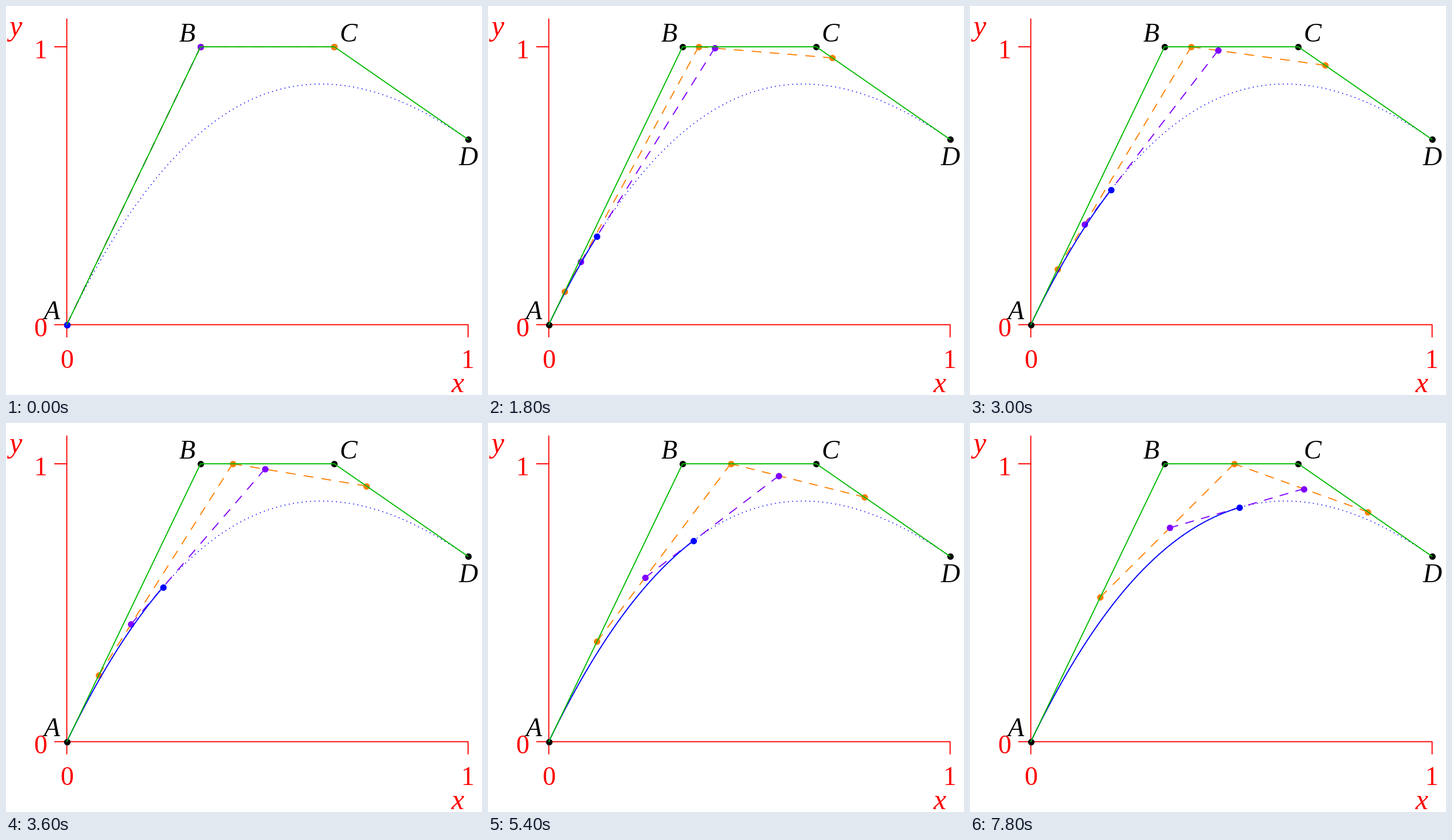
Animation, 827 px wide and 677 px high, one loop 8000 ms. Source, as a matplotlib script:

```python
import matplotlib.pyplot as plt
import numpy as np
from matplotlib.animation import FuncAnimation

WIDTH, HEIGHT, DPI = 827, 677, 72  # at 72 dpi one point is one pixel
LINE = 1.87
DOT = 6 * LINE
INTERVAL, FRAMES = 100, 80
FRAMES_PER_STEP, STEP = 3, 0.02

RED, BLUE, GREEN = "#ff0000", "#0000ff", "#00bb00"
ORANGE, PURPLE = "#ff8000", "#8000ff"

ORIGIN = np.array([105.6, 554.6])
UNIT = np.array([697.2, -483.6])
CONTROL = ORIGIN + UNIT * np.array([[0, 0], [1 / 3, 1], [2 / 3, 1], [1, 2 / 3]])

plt.rcParams["path.snap"] = False
fig = plt.figure(figsize=((WIDTH + 0.01) / DPI, (HEIGHT + 0.01) / DPI),
                 dpi=DPI, facecolor="white")
ax = fig.add_axes([0, 0, 1, 1])
ax.set_xlim(0, WIDTH)
ax.set_ylim(HEIGHT, 0)
ax.axis("off")


def blend(points, t):
    """One de Casteljau level."""
    return points[:-1] * (1 - t) + points[1:] * t


def bezier(ts):
    ts = np.asarray(ts)[:, None]
    a, b, c, d = CONTROL
    s = 1 - ts
    return s**3 * a + 3 * s**2 * ts * b + 3 * s * ts**2 * c + ts**3 * d


def line(points, color, **style):
    return ax.plot(*np.transpose(points), color=color, lw=LINE, snap=False,
                   solid_capstyle="round", solid_joinstyle="round",
                   dash_capstyle="round", **style)[0]


def dots(points, color):
    return ax.plot(*np.transpose(points), "o", color=color, ms=DOT, mew=0,
                   snap=False)[0]


def fitted_dashes(length, on, off):
    """Scale a dash pattern (in line widths) so the path ends on a dash."""
    units = length / LINE
    count = max(round((units - on) / (on + off)), 1)
    scale = units / (count * (on + off) + on)
    return (0, (max(on * scale, 0.02), off * scale))


def set_points(artist, points):
    artist.set_data(*np.transpose(points))


def set_dashed(artist, points):
    set_points(artist, points)
    length = np.hypot(*(points[1] - points[0]))
    artist.set_linestyle(fitted_dashes(length, 8, 8))


def label(text, x, baseline, color="black", style="italic", size=46):
    ax.text(x, baseline, text, color=color, style=style, size=size,
            family="Liberation Serif", ha="center", va="baseline")


# Axes with end ticks
x0, y0 = ORIGIN
x1, y1 = ORIGIN + UNIT
line([(x0, 22.5), (x0, 576)], RED)
line([(84.5, y0), (x1, y0), (x1, 576)], RED)
line([(84.5, y1), (x0, y1)], RED)
for text, x, baseline in (("1", 60, 91), ("0", 59.5, 575),
                          ("0", 105.5, 630), ("1", 802.5, 630)):
    label(text, x, baseline, RED, "normal")
label("y", 16.5, 51, RED, size=50)
label("x", 785, 672, RED, size=50)

curve = bezier(np.linspace(0, 1, 300))
curve_length = np.hypot(*np.diff(curve, axis=0).T).sum()
line(curve, BLUE, ls=fitted_dashes(curve_length, 0, 4))
dots(CONTROL, "black")

first_lines = [line(CONTROL[:2], ORANGE) for _ in range(2)]
first_dots = dots(CONTROL[:3], ORANGE)
second_line = line(CONTROL[:2], PURPLE)
second_dots = dots(CONTROL[:2], PURPLE)
trace = line(CONTROL[:1], BLUE)
tip = dots(CONTROL[:1], BLUE)
line(CONTROL, GREEN)

for text, x, baseline in (("A", 79.5, 545), ("B", 314.5, 62),
                          ("C", 595, 62), ("D", 803.5, 277)):
    label(text, x, baseline)


def update(frame):
    t = frame // FRAMES_PER_STEP * STEP
    first = blend(CONTROL, t)
    second = blend(first, t)
    for i, artist in enumerate(first_lines):
        set_dashed(artist, first[i:i + 2])
    set_points(first_dots, first)
    set_dashed(second_line, second)
    set_points(second_dots, second)
    set_points(trace, bezier(np.linspace(0, t, 120)))
    set_points(tip, blend(second, t))
    return [*first_lines, first_dots, second_line, second_dots, trace, tip]


anim = FuncAnimation(fig, update, frames=FRAMES, interval=INTERVAL,
                     repeat=True, repeat_delay=0, blit=False)
plt.show()
```
